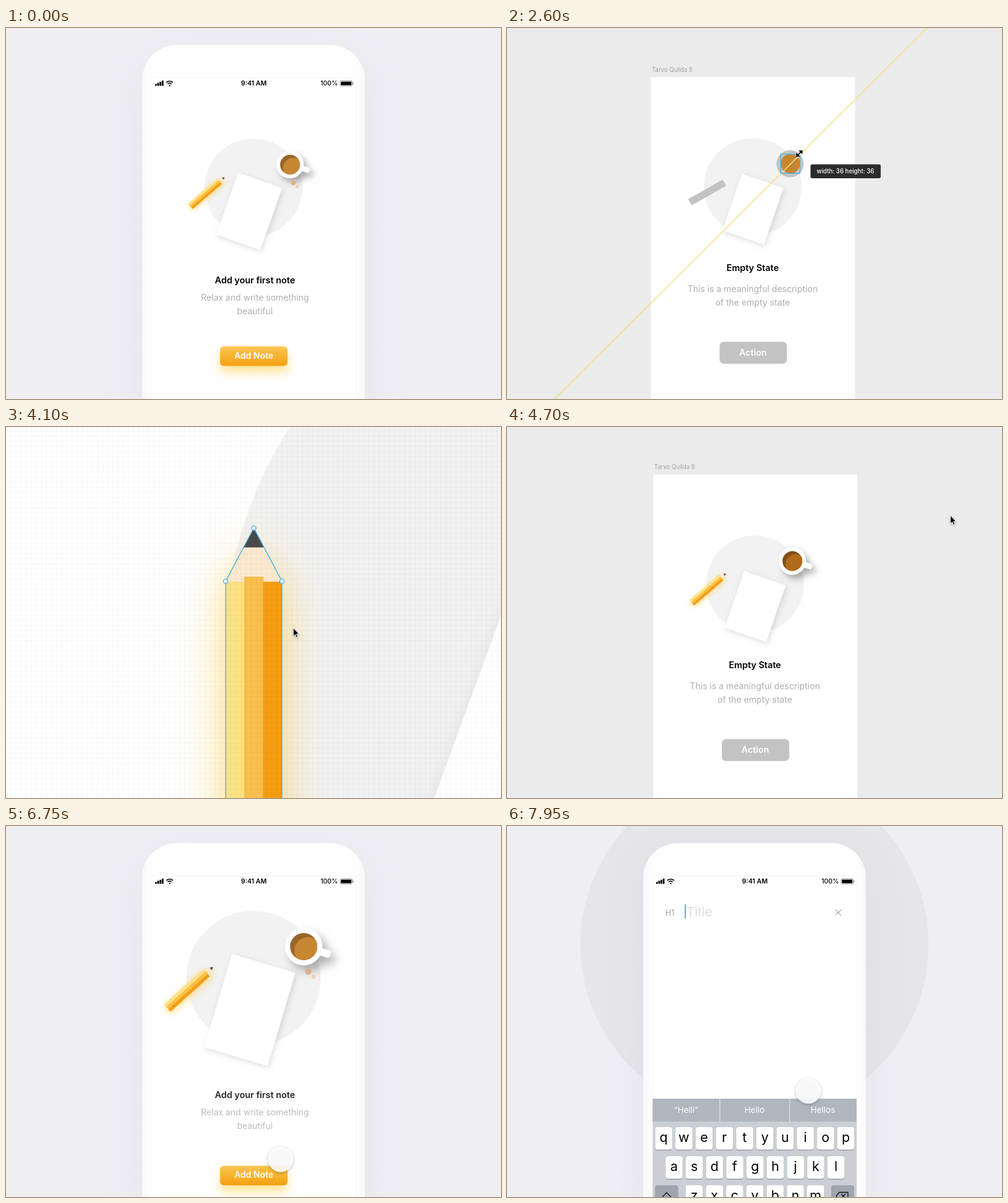
An HTML page with a canvas that plays this animation: 800x600 px, repeating every 8000 ms.

```html
<!DOCTYPE html>
<html lang="en">
<head>
<meta charset="utf-8">
<title>Empty state</title>
<style>
html, body { margin: 0; width: 100%; height: 100%; overflow: hidden; background: #ebebeb; }
canvas { display: block; }
</style>
</head>
<body>
<canvas id="stage" width="800" height="600"></canvas>
<script>
const c = document.getElementById('stage').getContext('2d');
const BLUE = '#3fb0e4', GUIDE = '#f5e27c', GREY = '#c3c3c3', DEG = Math.PI / 180;
const LABEL = 'Tarvo Quilda 8';

const clamp = v => Math.max(0, Math.min(1, v));
const ramp = (t, a, b) => clamp((t - a) / (b - a));
const smooth = v => v * v * (3 - 2 * v);
const mix = (a, b, v) => a + (b - a) * v;

// Eased position along [time, x, y] keys
function along(t, keys) {
  let i = 1;
  while (i < keys.length - 1 && t > keys[i][0]) i++;
  const a = keys[i - 1], b = keys[i], v = smooth(ramp(t, a[0], b[0]));
  return [mix(a[1], b[1], v), mix(a[2], b[2], v)];
}

function group(draw, { x = 0, y = 0, turn = 0, scale = 1, alpha = 1 } = {}) {
  c.save();
  c.translate(x, y);
  c.rotate(turn);
  c.scale(scale, scale);
  c.globalAlpha *= alpha;
  draw();
  c.restore();
}

function shadow(color, blur, x = 0, y = 0) {
  c.shadowColor = color;
  c.shadowBlur = blur;
  c.shadowOffsetX = x;
  c.shadowOffsetY = y;
}
const noShadow = () => shadow('transparent', 0);

function box(x, y, w, h, fill, r = 0) {
  c.beginPath();
  c.roundRect(x, y, w, h, r);
  c.fillStyle = fill;
  c.fill();
}

function disc(x, y, r, fill) {
  c.beginPath();
  c.arc(x, y, r, 0, 7);
  c.fillStyle = fill;
  c.fill();
}

function shape(points, fill) {
  c.beginPath();
  points.forEach(p => c.lineTo(...p));
  c.closePath();
  c.fillStyle = fill;
  c.fill();
}

function line(points, color, width = 1) {
  c.beginPath();
  points.forEach(p => c.lineTo(...p));
  c.strokeStyle = color;
  c.lineWidth = width;
  c.stroke();
}

function text(str, x, y, size, color, weight = 400, align = 'center') {
  c.font = `${weight} ${size}px Inter, Roboto, sans-serif`;
  c.textAlign = align;
  c.fillStyle = color;
  c.fillText(str, x, y);
}

function outline(x, y, w, h) {
  c.strokeStyle = BLUE;
  c.lineWidth = 1.3;
  c.strokeRect(x, y, w, h);
}

function pointer(x, y) {
  group(() => {
    shadow('rgba(0,0,0,.35)', 3, 0, 1);
    shape([[-1, -2], [-1, 13.5], [2.4, 10.6], [4.7, 15.5], [7.6, 14.2], [5.4, 9.5], [10, 9.3]], '#fff');
    noShadow();
    shape([[0, 0], [0, 11.5], [2.7, 9], [5, 13.9], [6.3, 13.3], [4.1, 8.4], [7.8, 8.2]], '#000');
  }, { x, y });
}

function resizeCursor(x, y) {
  group(() => {
    const head = [[7.5, 0], [2.5, -4.2], [2.5, 4.2]];
    line([[-6, 0], [6, 0]], '#fff', 4);
    line([[-5, 0], [5, 0]], '#000', 1.8);
    shape(head, '#000');
    shape(head.map(([a, b]) => [-a, b]), '#000');
  }, { x, y, turn: -45 * DEG });
}

// ---- Illustration parts, each centred on its own origin ----

function paper(w, h) {
  shadow('rgba(0,0,0,.13)', 8, 2, 3);
  box(-w / 2, -h / 2, w, h, '#fff');
  noShadow();
}

function pencil(scale) {
  shadow('rgba(255,196,40,.6)', 9 * scale, 0, 3 * scale);
  shape([[-36, -5.5], [26, -5.5], [36, 0], [26, 5.5], [-36, 5.5]], '#f9c04d');
  noShadow();
  shape([[26, -5.5], [36.5, 0], [26, 5.5]], '#fbe8cf');
  shape([[32.7, -2], [36.5, 0], [32.7, 2]], '#4a4a4a');
  box(-36, -5.5, 62, 3.7, '#fde283');
  box(-36, -1.9, 63, 3.8, '#f9c04d');
  box(-36, 1.8, 62, 3.7, '#f69d12');
}

function cup(scale, coffee, shade) {
  shadow('rgba(0,0,0,.3)', 11 * scale, 6 * scale, 7 * scale);
  c.beginPath();
  c.arc(0, 0, 22, 0, 7);
  c.fillStyle = '#fff';
  c.fill();
  group(() => box(18, -4.5, 15, 9, '#fff', 3), { turn: 17 * DEG });
  noShadow();
  disc(0, 0, 22, '#fff');
  disc(0, 0, 16, shade);
  c.save();
  c.clip();
  disc(5, 5, 16, coffee);
  c.restore();
}

function cta(x, y) {
  const fill = c.createLinearGradient(0, y, 0, y + 32);
  fill.addColorStop(0, '#f9c651');
  fill.addColorStop(1, '#f59f0e');
  shadow('rgba(255,205,70,.6)', 18, 0, 10);
  box(x, y, 109, 31.5, fill, 6);
  noShadow();
  text('Add Note', x + 54.5, y + 19.5, 14, '#fff', 600);
}

// ---- Design tool ----

function artboard(t) {
  const late = t > 4000, polish = t > 5000;
  box(0, 0, 800, 600, '#ebebeb');
  group(() => {
    text(LABEL, 234, 71, 9.65, '#a3a3a3', 400, 'left');
    box(232.5, 79.5, 330, 530, '#fff');
    disc(397, 257, 79, '#f2f2f2');

    if (t > 1600) {
      const grow = smooth(ramp(t, 1600, 1750));
      const turn = 19 * DEG * smooth(ramp(t, 1800, 1950));
      group(() => {
        paper(71 * grow, 97 * grow);
        if (t < 1950) outline(-35.5 * grow, -48.5 * grow, 71 * grow, 97 * grow);
      }, { x: 397.5, y: 293, turn });
    }
    if (t > 1950) {
      const name = polish ? 'Add your first note' : 'Empty State';
      const drop = polish ? 20 * smooth(ramp(t, 5050, 5200)) : 0;
      text(name, 397, 393 + drop, 14.4, '#000', 600);
      if (t > 2050) {
        const rows = polish ? ['Relax and write something', 'beautiful'] : ['This is a meaningful description', 'of the empty state'];
        rows.forEach((row, i) => text(row, 397, 426.5 + 22 * i + drop * .9, 14, '#adadad'));
      }
    }
    if (t > 5150) cta(343.5, 513);
    else if (t > 2120) {
      box(343.5, 507.5, 109, 35.5, GREY, 7);
      text('Action', 397.5, 529.5, 14.2, '#fff', 600);
    }
    if (late) group(() => pencil(1), { x: 322.5, y: 263.5, turn: -41 * DEG });
    else if (t > 2180) group(() => box(-32, -5.7, 64, 11.4, GREY), { x: 323.5, y: 266, turn: -29.5 * DEG });

    if (t > 2850) group(() => cup(1, '#b16b18', '#84501a'), { x: 457.5, y: 219.5 });
    else if (t > 2250) disc(457.5, 219.5, 22, GREY);
  }, late ? { x: 3.7, y: -2.7 } : {});

  if (t > 1550 && t < 1750) {
    line([[0, 257], [800, 257]], GUIDE, 1.5);
    line([[397.5, 0], [397.5, 600]], GUIDE, 1.5);
  }
  if (t > 5050 && t < 5200) line([[0, 410], [800, 410]], GUIDE, 1.5);

  if (t > 2350 && t < 2850) {
    const d = mix(5, 31, smooth(ramp(t, 2350, 2580)));
    const right = 442.5 + d, top = 235 - d;
    disc(442.5 + d / 2, 235 - d / 2, d / 2, '#c5852f');
    if (t < 2750) {
      const pts = Math.round(d * 36 / 31);
      line([[77, 600], [679, 0]], GUIDE, 1.5);
      outline(442.5, top, d, d);
      box(right + 17, top + 16.5, 113.5, 22.5, '#2c2c2c', 3);
      text(`width: ${pts} height: ${pts}`, right + 73.5, top + 31.2, 9.7, '#fff', 500);
      resizeCursor(right - 1, top - 1);
      return;
    }
  }
  pointer(...along(t, [
    [350, 618, 50], [750, 522, 401], [1450, 522, 401], [1600, 370, 245], [1750, 433, 341],
    [1950, 430, 388], [2100, 445, 520], [2200, 350, 250], [2350, 443, 234], [2750, 473, 204],
    [3100, 350, 255], [4350, 560, 190], [4700, 717, 144], [4850, 717, 144],
    [5050, 440, 386], [5200, 440, 520], [5450, 560, 470]
  ]));
}

function zoomed(t) {
  const k = 8.25, left = 355, right = 446, top = 163.5, step = 91 / 11;
  box(0, 0, 800, 600, '#fff');
  disc(1004, 354, 650, '#f2f2f2');
  shadow('rgba(0,0,0,.06)', 30, -2, 8);
  shape([[910, 5], [800, 305], [692, 600], [640, 742], [1200, 900]], '#fff');
  noShadow();

  const v = smooth(ramp(t, 3450, 3700)), shoulder = top + 86 * v, mid = (left + right) / 2;
  const body = [[left, 760], [left, shoulder], [mid, top], [right, shoulder], [right, 760]];
  if (t < 3800) {
    shadow('rgba(0,0,0,.10)', 50, 5, 5);
    shape(body, '#c4c4c4');
    noShadow();
  } else {
    group(() => pencil(k * ramp(t, 3900, 4100)), { x: mid, y: top + 36.5 * k, turn: -90 * DEG, scale: k });
  }

  c.beginPath();
  for (let x = left % step; x < 800; x += step) { c.moveTo(x, 0); c.lineTo(x, 600); }
  for (let y = top % step; y < 600; y += step) { c.moveTo(0, y); c.lineTo(800, y); }
  c.strokeStyle = 'rgba(0,0,0,.035)';
  c.lineWidth = 1;
  c.stroke();

  if (t < 4150) {
    line(body, BLUE, 1.3);
    const nodes = [[left, shoulder], [right, shoulder]];
    if (v > 0) nodes.push([mid, top]);
    else line([[left, top], [right, top]], BLUE, 1.3);
    nodes.forEach(([x, y]) => {
      disc(x, y, 3.6, '#fff');
      c.stroke();
    });
    if (v === 0) {
      disc(364, 172.5, 3.6, '#fff');
      c.stroke();
      disc(364, 172.5, 1.3, BLUE);
    }
  }
  pointer(...along(t, [[3150, 470, 230], [3300, 446, 193], [3450, 446, 164], [3700, 446, 250], [3950, 420, 390], [4350, 560, 190]]));
}

// ---- Phone ----

function statusBar() {
  [3, 5, 6.6, 8.6].forEach((h, i) => box(241 + 3.6 * i, 93.6 - h, 2.7, h, '#000', .6));
  disc(264.5, 93, 1.3, '#000');
  [4.4, 7.6].forEach(r => {
    c.beginPath();
    c.arc(264.5, 93.6, r, -135 * DEG, -45 * DEG);
    c.strokeStyle = '#000';
    c.lineWidth = 1.7;
    c.stroke();
  });
  text('9:41 AM', 400.5, 93.3, 10.6, '#000', 600);
  text('100%', 536.5, 93.3, 10.5, '#000', 500, 'right');
  c.beginPath();
  c.roundRect(540, 85.5, 19.5, 8.3, 1.5);
  c.strokeStyle = '#777';
  c.lineWidth = .8;
  c.stroke();
  box(541.3, 86.8, 16.9, 5.7, '#000', .6);
  box(560.3, 88, 1.2, 3.4, '#888', .6);
}

function key(x, y, w, fill = '#fff') {
  shadow('#8b8f96', 0, 0, 1.2);
  box(x, y, w, 36.5, fill, 4);
  noShadow();
}

function keyboard() {
  box(235.5, 441, 329.5, 170, '#cbced4');
  box(235.5, 441, 329.5, 37, '#b0b6be');
  box(343.3, 441, 1.3, 37, '#dfe2e6');
  box(456.3, 441, 1.3, 37, '#dfe2e6');
  ['“Helli”', 'Hello', 'Hellos'].forEach((word, i) => text(word, 289.5 + 110.5 * i, 463.7, 13.5, '#fff'));
  [['qwertyuiop', 239.5], ['asdfghjkl', 256.3], ['zxcvbnm', 288.8]].forEach(([row, x], r) => {
    [...row].forEach((ch, i) => {
      const kx = x + 32.7 * i, ky = 487 + 47 * r;
      key(kx, ky, 27.5);
      text(ch, kx + 13.7, ky + 23.5, 21.5, '#000');
    });
  });
  key(239.5, 581, 37, '#9fa5af');
  key(524, 581, 37, '#9fa5af');
  line([[249, 602], [258, 593], [267, 602]], '#111', 1.3);
  line([[532, 598.5], [537, 592.5], [551, 592.5], [551, 604.5], [537, 604.5], [532, 598.5]], '#111', 1.3);
  line([[540, 595], [547, 602]], '#111', 1.3);
  line([[547, 595], [540, 602]], '#111', 1.3);
}

function editor() {
  text('H1', 256, 145, 12.5, '#a5a5a5', 400, 'left');
  text('Title', 290, 145.5, 20.5, '#dcdcdc', 400, 'left');
  box(287.3, 126.5, 1.8, 23, '#4a9ee0');
  line([[530.7, 135.5], [540, 144.5]], '#a8a8a8', 1.2);
  line([[540, 135.5], [530.7, 144.5]], '#a8a8a8', 1.2);
}

function phone(t) {
  const p = Math.pow(ramp(t, 6400, 7350), 1.93);
  const q = Math.pow(p, 1.1);
  const s = 1 + 2.56 * p, cy = 258 - 66 * Math.pow(p, .88);
  const flyAlpha = clamp(2 - 2.5 * p);

  box(0, 0, 800, 600, '#efeef3');
  if (p > 0) disc(400, cy, 79 * s, '#e6e6ea');
  const shell = c.createLinearGradient(220, 0, 580, 0);
  [[0, '#f8f8f9'], [.03, '#fdfdfd'], [.06, '#fefefe'], [.94, '#fefefe'], [.97, '#fdfdfd'], [1, '#f8f8f9']]
    .forEach(stop => shell.addColorStop(...stop));
  shadow('rgba(40,40,70,.06)', 70, 0, 20);
  box(220, 27.5, 360, 660, shell, 56);
  noShadow();
  c.strokeStyle = '#f7f7f7';
  c.lineWidth = 1;
  c.strokeRect(235.5, 80.5, 330, 540);

  c.save();
  c.beginPath();
  c.rect(235.5, 81, 329.5, 519);
  c.clip();
  box(235, 80, 331, 520, '#fff');
  disc(400, cy, 79 * s, '#f2f2f2');
  group(() => paper(mix(75.5, 336, q), mix(106.5, 530, q)),
    { x: 393 + 7 * p, y: 296.5 + 44 * p * p, turn: 19.4 * DEG * (1 - p) });
  c.restore();

  if (flyAlpha > 0) {
    group(() => pencil(s), { x: 400 - 74.5 * s, y: cy + 7 * s + 40 * p, turn: (-40.5 - 10 * p) * DEG, scale: s, alpha: flyAlpha });
    group(() => {
      cup(s, '#c68733', '#98662a');
      disc(5.5, 29.5, 3.6, '#dcb182');
      disc(11.5, 35.5, 2.3, '#ecd2ae');
    }, { x: 400 + 59 * s, y: cy - 37 * s, scale: s, alpha: flyAlpha });
  }
  if (p < 1) {
    group(() => {
      text('Add your first note', 402.3, 413.2, 14.4, '#000', 600);
      text('Relax and write something', 402.3, 440.7, 14, '#b0b0b0');
      text('beautiful', 402.3, 462.7, 14, '#b0b0b0');
    }, { y: 184 * p, alpha: 1 - p });
    cta(346, 515 + 235 * p);
  }
  statusBar();

  const rise = 1 - Math.pow(1 - ramp(t, 7200, 7550), 3);
  if (t > 7200) group(keyboard, { y: 160 * (1 - rise) });
  if (t > 7400) group(editor, { alpha: ramp(t, 7400, 7650) });

  if (t > 5700) {
    const [x, y] = along(t, [[5700, 452, 625], [6300, 444, 539], [6850, 444, 539], [7850, 487, 428.5]]);
    shadow('rgba(0,0,0,.32)', 5, 0, 1.5);
    disc(x, y, 20.5, 'rgba(255,255,255,.75)');
    noShadow();
    disc(x, y, 20.5, 'rgba(255,255,255,.55)');
  }
}

function frame() {
  const t = performance.now() % 8000;
  c.clearRect(0, 0, 800, 600);
  if (t < 350 || t >= 5450) phone(t < 350 ? 0 : t);
  else if (t >= 3150 && t < 4350) zoomed(t);
  else artboard(t);
  requestAnimationFrame(frame);
}
frame();
</script>
</body>
</html>
```
